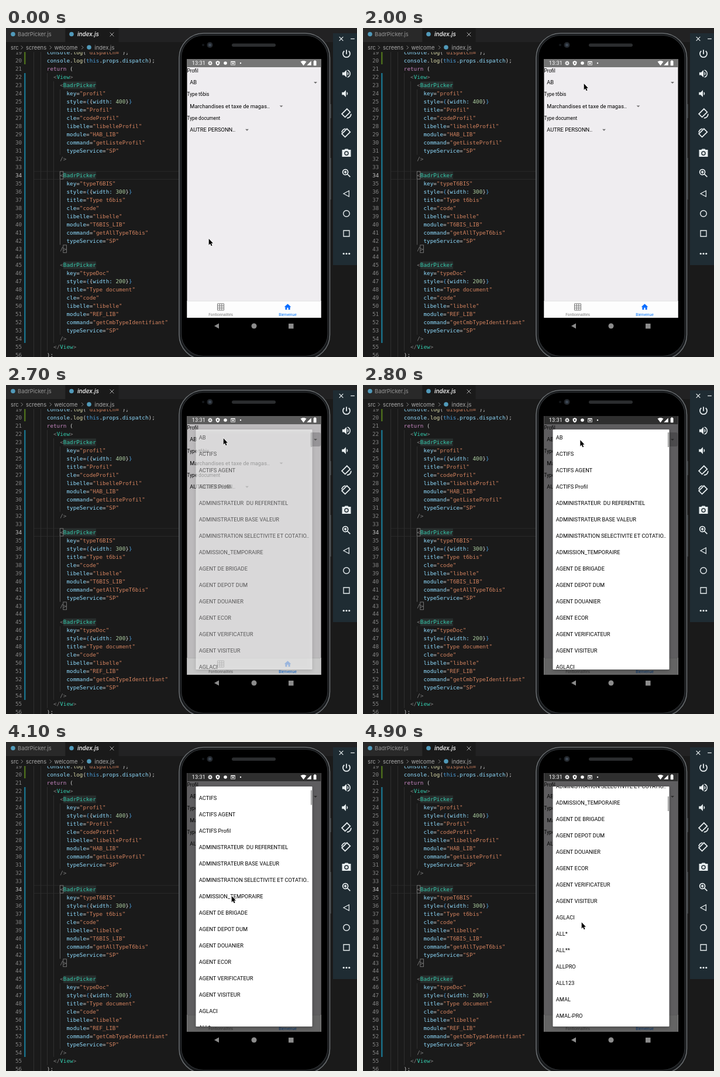
An HTML page with a canvas that plays this animation: 600x562 px, repeating every 5000 ms.

```html
<!DOCTYPE html>
<html lang="fr">
<head>
<meta charset="utf-8">
<title>Picker demo</title>
<style>
html, body { margin: 0; width: 100%; height: 100%; overflow: hidden; background: #1a1a1a; }
canvas { display: block; width: 600px; height: 562px; }
</style>
</head>
<body>
<canvas></canvas>
<script>
const LOOP = 5000, STEP = 100;
const MONO = '9.31px "DejaVu Sans Mono", monospace';
const UI = '9.4px Inter, sans-serif';
const ROBOTO = 'Roboto, sans-serif';
const CHAR = 5.605, LEFT = 47.4;
const C = { bg: '#1a1a1a', tag: '#35caad', attr: '#8fdcff', str: '#d4835f', num: '#aed0a2', gray: '#808080',
  fg: '#d4d4d4', blue: '#4a9fdc', fn: '#dcdcaa', key: '#c586c0' };

const canvas = document.querySelector('canvas');
const dpr = window.devicePixelRatio || 1;
canvas.width = 600 * dpr;
canvas.height = 562 * dpr;
const g = canvas.getContext('2d');

const items = ['AB', 'ACTIFS', 'ACTIFS AGENT', 'ACTIFS Profil', 'ADMINISTRATEUR  DU REFERENTIEL',
  'ADMINISTRATEUR BASE VALEUR', 'ADMINISTRATION SELECTIVITE ET COTATIO..', 'ADMISSION_TEMPORAIRE',
  'AGENT DE BRIGADE', 'AGENT DEPOT DUM', 'AGENT DOUANIER', 'AGENT ECOR', 'AGENT VERIFICATEUR',
  'AGENT VISITEUR', 'AGLACI', 'ALL*', 'ALL**', 'ALLPRO', 'ALL123', 'AMAL', 'AMAL-PRO'];

// keyframes: [time, ...values]
const cursorKeys = [[0, 347, 360], [900, 396, 121], [1300, 378, 97], [2000, 378, 95], [2700, 372, 91],
  [3000, 371, 100], [3400, 371, 215], [4100, 386, 263], [4900, 374, 308]];
const scrollKeys = [[3900, 0], [4100, 22], [4900, 182]];
const openKeys = [[2500, 0], [2600, 0.1], [2700, 0.6], [2800, 1]];

function at(keys, t) {
  if (t <= keys[0][0]) return keys[0].slice(1);
  for (let i = 1; i < keys.length; i++) {
    const [a, b] = [keys[i - 1], keys[i]];
    if (t <= b[0]) {
      const u = (t - a[0]) / (b[0] - a[0]);
      return a.slice(1).map((v, j) => v + (b[j + 1] - v) * u);
    }
  }
  return keys[keys.length - 1].slice(1);
}

function rect(x, y, w, h, fill) {
  g.fillStyle = fill;
  g.fillRect(x, y, w, h);
}
function round(x, y, w, h, r, fill, line, lw = 1) {
  g.beginPath();
  g.roundRect(x, y, w, h, r);
  if (fill) { g.fillStyle = fill; g.fill(); }
  if (line) { g.strokeStyle = line; g.lineWidth = lw; g.stroke(); }
}
function dot(x, y, r, fill) {
  g.beginPath();
  g.arc(x, y, r, 0, 7);
  g.fillStyle = fill;
  g.fill();
}
function text(s, x, y, color, font, align = 'left') {
  g.font = font;
  g.textAlign = align;
  g.fillStyle = color;
  g.fillText(s, x, y);
}
// icon on a 24 unit grid, centred at x, y
function icon(x, y, size, color, fillPath, linePath, lw = 2) {
  g.save();
  g.translate(x - size / 2, y - size / 2);
  g.scale(size / 24, size / 24);
  g.fillStyle = g.strokeStyle = color;
  g.lineWidth = lw;
  if (fillPath) g.fill(new Path2D(fillPath), 'evenodd');
  if (linePath) g.stroke(new Path2D(linePath));
  g.restore();
}

const lineY = n => 56 + 13.97 * (n - 20);
const colX = c => LEFT + c * CHAR;

function code(n, indent, ...parts) {
  let c = indent;
  for (const [s, color] of parts) {
    text(s, colX(c), lineY(n) + 3.2, color, MONO);
    c += s.length;
  }
}
function guides(from, to, ...cols) {
  for (const c of cols) rect(Math.round(colX(c)), lineY(from) - 7, 0.7, (to - from + 1) * 13.97, '#3a3a3a');
}
function bracketBox(n, c) {
  g.strokeStyle = '#888';
  g.lineWidth = 0.8;
  g.strokeRect(colX(c), lineY(n) - 6.5, CHAR, 13);
}
function picker(n, width, props) {
  rect(colX(9), lineY(n) - 6.5, CHAR * 10, 13, '#272e2d');
  code(n, 8, ['<', C.gray], ['BadrPicker', C.tag]);
  for (const [name, value] of Object.entries(props)) {
    n++;
    code(n, 10, [name, C.attr], ['=', C.fg], [`"${value}"`, C.str]);
    if (name === 'key') {
      n++;
      code(n, 10, ['style', C.attr], ['=', C.fg], ['{', C.blue], ['{', C.fg], ['width:', C.attr],
        [' ' + width, C.num], ['}', C.fg], ['}', C.blue]);
    }
  }
  code(n + 1, 8, ['/>', C.gray]);
}

function drawEditor() {
  rect(0, 0, 600, 562, C.bg);
  guides(19, 56, 0, 2);
  guides(22, 55, 4);
  guides(23, 54, 6);
  guides(24, 31, 8);
  guides(46, 53, 8);
  rect(92, lineY(35) - 7, 0.8, 8 * 13.97, '#707070');
  rect(48, lineY(34) - 7, 250, 0.8, '#2e2e2e');
  rect(48, lineY(34) + 6.5, 250, 0.8, '#2e2e2e');
  rect(31, 41, 2.5, 21, '#4c6d1c');
  rect(31, 77, 2.5, 461, '#1a7089');
  for (let n = 19; n <= 56; n++)
    text(n, 27.2, lineY(n) + 3.2, n === 34 ? '#c6c6c6' : '#858585', MONO, 'right');

  code(19, 4, ['console', C.attr], ['.', C.fg], ['log', C.fn], ['(', C.fg], ['"dispatch="', C.str], [');', C.fg]);
  code(20, 4, ['console', C.attr], ['.', C.fg], ['log', C.fn], ['(', C.fg], ['this', C.blue], ['.', C.fg],
    ['props', C.attr], ['.', C.fg], ['dispatch', C.attr], [');', C.fg]);
  code(21, 4, ['return', C.key], [' (', C.fg]);
  code(22, 6, ['<', C.gray], ['View', C.tag], ['>', C.gray]);
  picker(23, 400, { key: 'profil', title: 'Profil', cle: 'codeProfil', libelle: 'libelleProfil',
    module: 'HAB_LIB', command: 'getListeProfil', typeService: 'SP' });
  picker(34, 300, { key: 'typeT6BIS', title: 'Type t6bis', cle: 'code', libelle: 'libelle',
    module: 'T6BIS_LIB', command: 'getAllTypeT6bis', typeService: 'SP' });
  picker(45, 200, { key: 'typeDoc', title: 'Type document', cle: 'code', libelle: 'libelle',
    module: 'REF_LIB', command: 'getCmbTypeIdentifiant', typeService: 'SP' });
  code(55, 6, ['</', C.gray], ['View', C.tag], ['>', C.gray]);
  code(56, 4, [');', C.fg]);
  bracketBox(34, 8);
  bracketBox(43, 9);

  // tabs and breadcrumbs
  rect(0, 0, 600, 41, C.bg);
  rect(0, 0, 600, 24, '#222223');
  rect(0, 0, 101, 24, '#292929');
  rect(101.5, 0, 91, 24, C.bg);
  text('BadrPicker.js', 20, 14, '#969696', UI);
  text('index.js', 122, 14, '#fff', 'italic 500 10px Inter, sans-serif');
  icon(181, 11, 10, '#ccc', '', 'M4 4 20 20M20 4 4 20');
  for (const [x, y] of [[12, 10.5], [112, 10.5], [142, 33]]) dot(x, y, 3.8, '#519aba');
  const crumbs = [['src', 8], ['screens', 34], ['welcome', 82.5], ['index.js', 151.5]];
  for (const [s, x] of crumbs) text(s, x, 36.5, '#a9a9a9', UI);
  for (const x of [27, 76, 130.5]) icon(x, 33.3, 8, '#a0a0a0', '', 'M8 3 17 12 8 21', 2.5);
}

function drawPhone() {
  rect(553, 130, 3, 24, '#34373a');
  rect(553, 222, 3, 71, '#34373a');
  round(296, 9, 257.5, 557, 42, '#17191b', '#686c6f', 1.6);
  round(299.5, 12.5, 250.5, 548, 38, '#000', '#303336', 1.2);
  round(386, 26.5, 75, 5.5, 2.7, '#2b2d2f');
  dot(337, 29, 2, '#14171b');
  dot(348.5, 29, 5, '#23272c');
  dot(348.5, 29, 2.5, '#3d4855');
  icon(360, 509, 12, '#8c8c8c', 'M20 3V21L4 12Z');
  dot(424, 509, 4.5, '#8c8c8c');
  rect(483, 505, 8.5, 8.5, '#8c8c8c');
}

function drawStatus() {
  const w = '#fff';
  text('13:31', 317.8, 63.4, w, '9.3px ' + ROBOTO);
  g.setLineDash([1.2, 0.9]);
  g.beginPath();
  g.arc(349, 60, 3.1, 0, 7);
  g.strokeStyle = w;
  g.lineWidth = 1.4;
  g.stroke();
  g.setLineDash([]);
  g.beginPath();
  g.arc(349, 60, 2, 0, 7);
  g.stroke();
  icon(362, 60, 9, w, 'M12 1 21 5V11C21 17 17 21 12 23 7 21 3 17 3 11V5ZM9 8V15H15V8Z');
  dot(375, 60, 2.8, w);
  icon(388, 60, 9, w, 'M2 3H22V21H2ZM4 8V19H20V8ZM7 11H17V16H7Z');
  dot(401, 60, 1.2, w);
  icon(508.5, 60, 10, w, 'M12 22 0 6C7 1 17 1 24 6Z');
  icon(518, 60, 9, w, 'M2 22H22V2Z');
  round(525.7, 56.2, 4.8, 8, 0.6, w);
  rect(527, 55.3, 2.2, 1.5, w);
}

function field(label, value, y, arrowX) {
  text(label, 309.5, y + 2.7, '#000', '8.25px ' + ROBOTO);
  text(value, 314.3, y + 23.3, '#000', '9.3px ' + ROBOTO);
  icon(arrowX, y + 20.2, 14, '#707070', 'M7 10 12 15 17 10Z');
}

function drawApp(open, t) {
  rect(309.5, 53, 229, 442, '#efedf0');
  rect(309.5, 53, 229, 14, '#757575');
  if (t >= 2600 && t < 2900) round(520, 81, 18, 24, 3, 'rgba(0,0,0,.2)');
  field('Profil', 'AB', 73, 529);
  field('Type t6bis', 'Marchandises et taxe de magas..', 113.4, 470.5);
  field('Type document', 'AUTRE PERSONN..', 153.8, 412);
  rect(309.5, 466, 229, 29, '#fdfdfd');
  rect(309.5, 466, 229, 0.7, '#d8d8d8');
  icon(367, 476.5, 12, '#757575', '', 'M1 1H23V23H1ZM1 8.3H23M1 15.6H23M8.3 1V23M15.6 1V23');
  icon(481.5, 476.5, 14, '#0a6cff', 'M10 20V14H14V20H19V12H22L12 3 2 12H5V20Z');
  text('Fontionnalités', 367, 492.3, '#808080', '6.6px ' + ROBOTO, 'center');
  text('Bienvenue', 481.5, 492.3, '#0a7aff', '6.6px ' + ROBOTO, 'center');
  rect(309.5, 53, 229, 442, `rgba(0,0,0,${0.6 * open * open})`);
  drawStatus();
}

function drawPopup(open, scroll) {
  if (!open) return;
  g.save();
  g.globalAlpha = open;
  g.shadowColor = 'rgba(0,0,0,.25)';
  g.shadowBlur = 6 * dpr;
  g.shadowOffsetY = 2 * dpr;
  round(324.5, 76, 199, 410, 1, '#fff');
  g.shadowColor = 'transparent';
  g.clip();
  items.forEach((s, i) => text(s, 329.8, 93.3 + 28 * i - scroll, '#000', '9.25px ' + ROBOTO));
  rect(520.8, 81 + scroll * 0.066, 2.7, 25, '#a8a8a8');
  g.restore();
}

function drawToolbar() {
  rect(559, 9, 41, 396, '#1f2c33');
  const w = '#e8eef0';
  const phone = 'M13 2 2 13 9 20 20 9Z';
  const speaker = 'M3 9H7L12 4V20L7 15H3Z';
  icon(573, 18.5, 10, w, '', 'M4 4 20 20M20 4 4 20', 3);
  icon(592.5, 18.5, 10, w, '', 'M4 12H20', 3);
  icon(582, 44, 18, w, '', 'M12 3V13M7 5.7A8 8 0 1 0 17 5.7', 2.4);
  icon(582, 78, 19, w, speaker + 'M14 8A4.5 4.5 0 0 1 14 16Z', 'M14 4.3A8 8 0 0 1 14 19.7');
  icon(581, 112, 18, w, speaker + 'M14 8A4.5 4.5 0 0 1 14 16Z');
  icon(582, 146, 19, w, '', phone + 'M13 22A9 9 0 0 0 22 13', 2.2);
  icon(582, 180, 19, w, '', phone + 'M2 10A9 9 0 0 1 10 2', 2.2);
  icon(582, 214, 18, w, 'M9 2 7 4H2V20H22V4H17L15 2ZM12 7A5 5 0 1 1 12 17 5 5 0 1 1 12 7Z');
  dot(582, 214, 2.3, w);
  icon(582, 248, 18, w, '', 'M15.5 9.5A6 6 0 1 1 3.5 9.5 6 6 0 1 1 15.5 9.5ZM14 14 20.5 20.5M9.5 6.5V12.5M6.5 9.5H12.5', 2.3);
  icon(582, 283, 15, w, '', 'M19 4V20L4 12Z');
  icon(582, 317, 17, w, '', 'M19.5 12A7.5 7.5 0 1 1 4.5 12 7.5 7.5 0 1 1 19.5 12Z');
  icon(582, 351, 16, w, '', 'M4.5 4.5H19.5V19.5H4.5Z');
  for (const x of [577.2, 582, 586.8]) dot(x, 385.5, 1.6, w);
}

function drawCursor(x, y) {
  g.save();
  g.translate(x - 0.3, y);
  g.scale(0.9, 0.95);
  const p = new Path2D('M0 0V11.2L2.6 8.8 4.5 13 6.5 12.1 4.6 8.1H8Z');
  g.strokeStyle = '#fff';
  g.lineWidth = 1.2;
  g.stroke(p);
  g.fillStyle = '#000';
  g.fill(p);
  g.restore();
}

function draw(t) {
  const [open] = at(openKeys, t);
  g.setTransform(dpr, 0, 0, dpr, 0, 0);
  drawEditor();
  drawPhone();
  drawApp(open, t);
  drawPopup(open, at(scrollKeys, t)[0]);
  drawToolbar();
  drawCursor(...at(cursorKeys, t));
}

const start = performance.now();
function tick() {
  const t = (performance.now() - start) % LOOP;
  draw(Math.floor(t / STEP) * STEP);
  requestAnimationFrame(tick);
}
tick();
</script>
</body>
</html>
```
